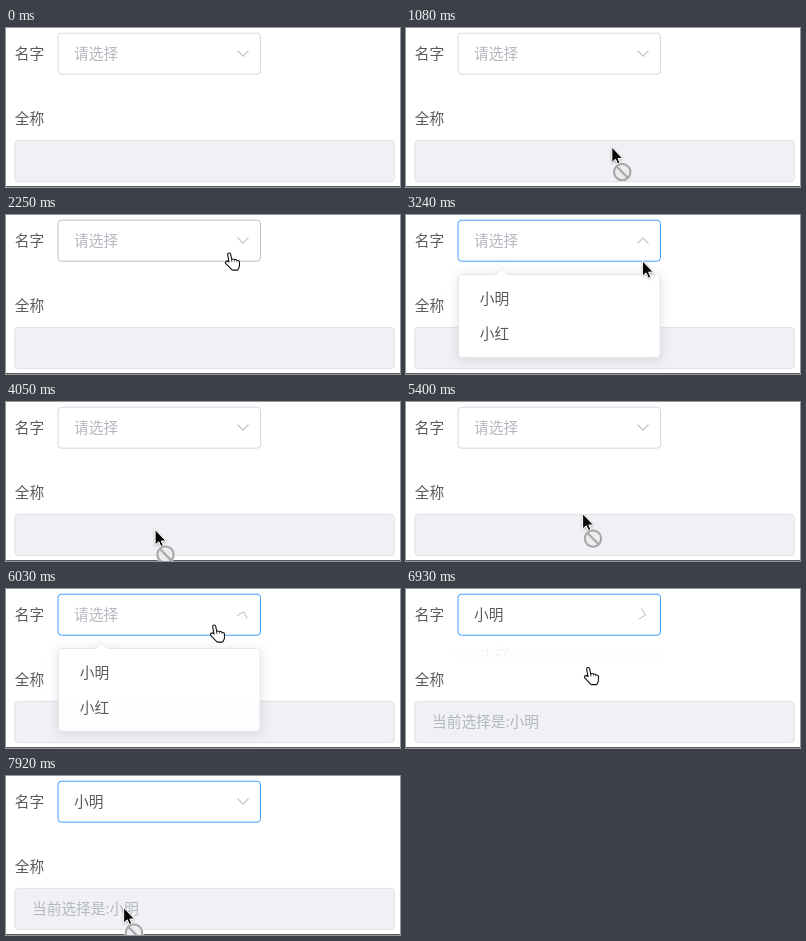
Write an HTML page that moves like this. It is 394x159 px and loops after 8 s.

```html
<!DOCTYPE html>
<html lang="zh-CN">
<head>
<meta charset="utf-8">
<title>选择器联动</title>
<style>
  html, body { margin: 0; width: 100%; height: 100%; overflow: hidden; background: #fff; }
  svg { display: block; width: 394px; height: 159px; }
  text { font: 14.7px "Noto Sans CJK SC", "Noto Sans CJK", "Noto Sans SC", sans-serif; fill: #585a5e; }
  .hint { fill: #b4b7bf; }
  .panel { filter: drop-shadow(0 2px 6px rgba(20, 30, 60, .13)); }
  .hand { fill: none; stroke: #111; stroke-width: 4.2; stroke-linecap: round; stroke-linejoin: round; }
  .skin { fill: #fff; stroke: #fff; stroke-width: 2; }
  .arrow { fill: #080808; stroke: #fff; filter: drop-shadow(0 1px 1px rgba(0, 0, 0, .25)); }
  .ban { fill: #ececef; stroke: #a9a9ac; stroke-width: 2.2; }
</style>
</head>
<body>
<svg viewBox="0 0 394 159">
  <text x="8.7" y="31">名字</text>
  <rect id="field" x="52" y="5.2" width="202.5" height="41" rx="3.5" fill="#fff"/>
  <text id="value" x="68" y="31"></text>
  <path id="chevron" d="M-5.5 3 L0 -2.6 L5.5 3" fill="none" stroke="#c0c4cc" stroke-width="1.1"/>

  <text x="8.7" y="95.7">全称</text>
  <rect x="8.8" y="112.4" width="379.5" height="41.2" rx="3.5" fill="#f0f1f5" stroke="#dfe2e9"/>
  <text id="full" class="hint" x="26" y="138"></text>
  <rect y="158" width="394" height="1" fill="#5c5c5c"/>

  <g id="menu">
    <g class="panel">
      <rect x="52.5" y="59.5" width="201.5" height="83" rx="3.5" fill="#fff" stroke="#e4e7ed"/>
      <path d="M89 60 L95.5 53.8 L102 60" fill="#fff" stroke="#e4e7ed"/>
    </g>
    <rect id="option" x="53" y="67" width="200.5" height="35" fill="#f5f7fa"/>
    <text x="73.8" y="89">小明</text>
    <text x="73.8" y="124">小红</text>
  </g>

  <g id="cursor">
    <g id="hand" class="hand">
      <path id="fingers" d="M-.8 1.6 L1 11 M3.2 7.6 V12 M5.6 8 V12 M7.9 9 V13 L6.8 15.6 H2.8 L-3 9.6"/>
      <use href="#fingers" class="skin"/>
    </g>
    <path id="arrow" class="arrow" d="M-.4 -.4 V15 L3.3 11.8 L5.6 17 L8 16 L5.8 11 H10.5 Z"/>
    <g id="ban" transform="translate(10 24.6)">
      <circle r="9.8" fill="#fff"/>
      <g class="ban"><circle r="8.2"/><path d="M-5.6 -5.6 L5.6 5.6"/></g>
    </g>
  </g>
</svg>
<script>
const LOOP = 8000, STEP = 90, FADE = 300;
const APPEAR = 900, HOVER = 6390, PICK = 6825;
const visits = [{ open: 2490, close: 3420 }, { open: 5825, close: PICK }];

// The pointer rests between moves
const home = { x: 200, y: 148 };
const moves = [
  { from: APPEAR, to: 1440, x: 224, y: 38 },
  { from: 3060, to: 3780, x: 306, y: 90 },
  { from: 3780, to: 4050, x: 149.5, y: 128 },
  { from: 4050, to: 4860, x: 18, y: 126 },
  { from: 4860, to: 5400, x: 177, y: 112 },
  { from: 5400, to: 5670, x: 209, y: 36 },
  { from: 6030, to: 6300, x: 183, y: 78.5 },
  { from: 6930, to: 7650, x: 108, y: 130 },
  { from: 7650, to: 7920, x: 118, y: 132 }
];

const $ = id => document.getElementById(id);
const set = (id, name, value) => $(id).setAttribute(name, value);
const show = (id, on) => set(id, 'visibility', on ? 'visible' : 'hidden');
const progress = (t, from, to) => Math.max(0, Math.min(1, (t - from) / (to - from)));
const smooth = k => k * k * (3 - 2 * k);
const easeOut = (k, power) => 1 - (1 - k) ** power;

function pointAt(t) {
  return moves.reduce((p, m) => {
    const k = smooth(progress(t, m.from, m.to));
    return { x: p.x + (m.x - p.x) * k, y: p.y + (m.y - p.y) * k };
  }, home);
}

function openness(t, power) {
  const eased = start => easeOut(progress(t, start, start + FADE), power);
  return visits.reduce((sum, v) => sum + eased(v.open) - eased(v.close), 0);
}

function drawCursor(t, menuShown) {
  const { x, y } = pointAt(t);
  const visible = t >= APPEAR;
  const within = (l, top, r, b) => x >= l && x <= r && y >= top && y <= b;
  const onField = visible && within(52, 5, 255, 46);
  const hand = onField || (menuShown && within(53, 59, 254, 142));
  set('cursor', 'transform', `translate(${x} ${y})`);
  show('hand', visible && hand);
  show('arrow', visible && !hand);
  show('ban', visible && !hand && within(9, 112, 388, 154));
  return onField;
}

function draw(t) {
  const unfold = openness(t, 5);
  const turn = 180 * (1 - openness(t, 2));
  const picked = t >= PICK;
  const focused = picked || visits.some(v => t >= v.open && t < v.close);
  const hovered = drawCursor(t, unfold > 0);

  set('field', 'stroke', focused ? '#409eff' : hovered ? '#bbbfc7' : '#d5d8df');
  $('value').textContent = picked ? '小明' : '请选择';
  set('value', 'class', picked ? '' : 'hint');
  $('full').textContent = picked ? '当前选择是:小明' : '';
  set('chevron', 'transform', `translate(237 25.5) rotate(${turn})`);
  set('menu', 'transform', `translate(0 59) scale(1 ${Math.max(unfold, .001)}) translate(0 -59)`);
  set('menu', 'opacity', unfold);
  show('option', t >= HOVER);
}

const begin = performance.now();
function tick() {
  const t = (performance.now() - begin) % LOOP;
  draw(Math.floor(t / STEP) * STEP);
  requestAnimationFrame(tick);
}
tick();
</script>
</body>
</html>
```
